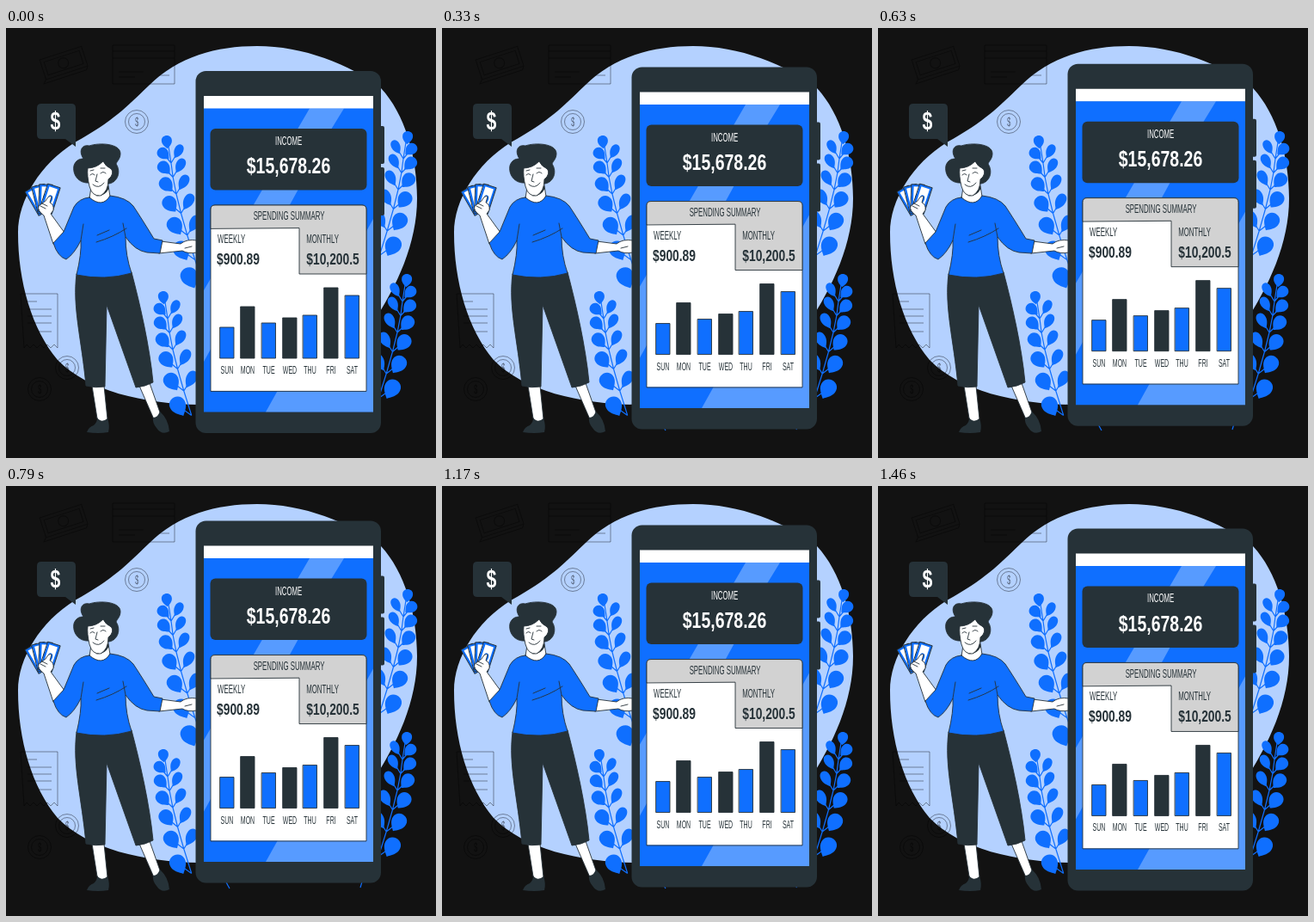
An HTML page that plays this animation: 500 by 500 pixels, repeating every 1.5 s.

```html
<!DOCTYPE html>
<html lang="en">
<head>
<meta charset="utf-8">
<title>Income app</title>
<style>
  html, body { margin: 0; width: 100%; height: 100%; overflow: hidden; background: #121212; }
  svg { display: block; width: 100%; height: 100%; }
  .blue { fill: #0f6fff; }
  .dark { fill: #263238; }
  .white { fill: #fff; }
  .ink { stroke: #263238; stroke-width: .9; stroke-linejoin: round; stroke-linecap: round; }
  .line { fill: none; }
  .faint { fill: none; stroke: #000; stroke-opacity: .4; }
  .stem { fill: none; stroke: #0f6fff; stroke-width: 1.2; }
  text { font-family: "Liberation Sans", Arial, sans-serif; text-anchor: middle;
         transform-box: fill-box; transform-origin: center; }
  .thin { transform: scaleX(.56); }
  .bold { transform: scaleX(.735); font-weight: bold; }
</style>
</head>
<body>
<svg viewBox="0 0 500 500">
  <path fill="#b4d1ff" d="M14 238C14 200 40 158 80 133C125 108 140 92 166 67C200 33 245 21 292 21C345 21 400 42 436 70C464 100 478 150 478 198C478 250 455 300 425 345C380 420 300 438 225 438C160 437 95 422 60 386C30 350 14 295 14 238Z"/>

  <g class="faint">
    <g transform="rotate(-18 66 42)">
      <path d="M42 29H93V53H42Z M46 33H89V49H46Z M42 53L38 57H90L93 53"/>
      <circle cx="67" cy="41" r="6"/>
    </g>
    <path d="M124 20H196V65H124Z M124 27H196 M124 35H196 M131 51H160 M131 57H150 M178 55H190"/>
    <path d="M17 309H60V372l-4-4-4 4-4-4-4 4-4-4-4 4-4-4-4 4-4-4-3 4Z M25 318H36 M25 327H53 M25 335H53 M25 343H53 M38 353H53"/>
    <g id="coins"></g>
  </g>

  <g id="plants"></g>

  <g id="bubble">
    <path class="dark" d="M41 88H76Q81 88 81 93V138L69 129H41Q36 129 36 124V93Q36 88 41 88Z"/>
    <text class="bold white" x="57.500" y="118.500" font-size="29">$</text>
  </g>

  <g id="woman">
    <path class="white ink" d="M100 416L106 454Q110 461 118 455L114 416Z M155 416L172 455Q177 453 179 447L167 413Z"/>
    <path class="dark" d="M106 453Q111 460 118 454Q121 462 119 470Q107 472 94 470Q96 464 102 462Q106 459 106 453Z M171 453Q177 453 179 446Q189 455 190 469Q181 474 175 465Q170 459 171 453Z"/>
    <path class="dark ink" d="M82 286C77 325 88 362 93 416Q104 419 115 417L117 322L151 418Q162 417 171 412C167 370 156 322 146 284Z"/>
    <g id="bills" transform="translate(46 216)"></g>
    <path class="white ink" d="M55 251L44 218Q36 212 38 207L46 201Q50 194 53 196L51 203Q56 205 55 212L52 216L68 238Z"/>
    <path class="line ink" d="M40 207L46 210M42 204L48 207"/>
    <path class="white ink" d="M180 248L203 251Q210 245 222 247V261Q212 263 205 259L178 262Z"/>
    <path class="line ink" d="M208 256L216 254"/>
    <path class="dark ink" d="M90 152C84 143 88 135 97 137C108 133 133 134 133 146C133 152 129 155 128 158C134 167 130 179 120 181L97 180C84 181 77 170 79 160C81 154 85 152 90 152Z"/>
    <path class="white ink" d="M99 185L97 198Q112 211 121 196L118 177Z"/>
    <path class="dark" d="M104 195Q116 193 119 182L119.500 187Q114 197 104 195Z"/>
    <path class="white ink" d="M95 163Q105 163 113 155Q116 161 121 163Q126 166 122 173L119 176Q119 190 110 195Q100 196 97 184Q94 172 95 163Z"/>
    <path class="line ink" d="M98 171q3-3 5 0M110 169q3-3 6 0M106 170l-2 8 3 1M101 182q7 6 13-2M98 166l4-1M110 163l5 0"/>
    <path class="blue ink" d="M97 197Q85 198 79 208L67 237L55 250Q60 266 70 269Q80 262 87 247Q88 262 82 287Q115 294 146 285Q139 265 139 243Q150 259 164 261L179 262L182 247L172 245Q158 222 148 207Q140 197 121 195Q112 210 97 197Z"/>
    <path class="line ink" d="M105 249Q125 243 140 233M106 241L120 235M87 247L90 228M139 243L136 227"/>
  </g>

  <g id="phone">
    <rect class="dark" x="432" y="114" width="8" height="44" rx="2"/>
    <rect class="dark" x="432" y="162" width="8" height="56" rx="2"/>
    <rect class="dark" x="220.500" y="50" width="215.500" height="421" rx="12"/>
    <path class="white" d="M230 79H427V94H230Z"/>
    <path class="blue" d="M230 93.500H427V446.500H230Z"/>
    <path class="white" opacity=".3" d="M353 93.500H393L378 118L230 388V305Z M302 446.500H427V222Z"/>
    <rect class="dark" x="237.500" y="117" width="182" height="71.500" rx="6"/>
    <path class="white ink" d="M238 422V211Q238 206 243 206H414Q419 206 419 211V422Z"/>
    <path class="ink" fill="#d2d2d2" d="M238 233V211Q238 206 243 206H414Q419 206 419 211V286H341V233Z"/>
    <g id="chart"></g>
  </g>
</svg>
<script>
const $ = id => document.getElementById(id);
const add = (id, markup) => $(id).insertAdjacentHTML('beforeend', markup);

const label = (str, x, y, size, style, fill = '#263238') =>
  add('chart', `<text class="${style}" x="${x}" y="${y}" font-size="${size}" fill="${fill}">${str}</text>`);

// Each coin is two rings around a dollar sign.
for (const [x, y] of [[152, 109], [71, 395], [39, 420]])
  add('coins', `<circle cx="${x}" cy="${y}" r="13.500"/><circle cx="${x}" cy="${y}" r="9.500"/>
    <text class="thin" x="${x}" y="${y + 5}" font-size="14" stroke="none" fill="#000" opacity=".5">$</text>`);

for (const angle of [-30, -14, 2, 18])
  add('bills', `<g transform="rotate(${angle})"><rect class="blue ink" x="-8" y="-34" width="15" height="32"/>
    <rect class="white" x="-5.500" y="-31.500" width="10" height="27"/>
    <ellipse class="blue" cx="-.5" cy="-18" rx="3" ry="4.500"/></g>`);

// A teardrop centred on (x, y), its round end pointing along the angle.
const leaf = (x, y, length, angle, slim = 1) =>
  `<path class="blue" transform="translate(${x} ${y}) rotate(${angle}) scale(${length * slim} ${length})"
    d="M0 .55C-.15 .4 -.42 .2 -.4 -.1C-.38 -.6 .38 -.6 .4 -.1C.42 .2 .15 .4 0 .55Z"/>`;

// side is -1 when the large leaves grow to the left, 1 to the right.
function plant(x, y, side, count) {
  let stem = `M${x - side * 4} ${y}`, twigs = '';
  let leaves = leaf(x - side * 4, y + 7, 15, side * 6);
  for (let i = 0; i < count; i++) {
    const cx = x - side * .85 * i * i, cy = y + 21 + 15 * i + 1.5 * i * i;
    const sx = cx - side * (9 + 1.3 * i), sy = cy + 11;
    stem += `L${sx} ${sy}`;
    leaves += leaf(cx, cy, 16 + 1.5 * i, side * -(40 - 50 * 2 + 5 * i) * .8);
    twigs += `M${sx} ${sy}L${cx} ${cy}`;
    if (i < 5) {
      const ix = sx - side * 8.5, iy = cy - 3;
      leaves += leaf(ix, iy, 17 + i, -side * 28, .75);
      twigs += `M${sx} ${sy}L${ix} ${iy}`;
    }
  }
  add('plants', `<path class="stem" d="${stem}${twigs}"/>${leaves}`);
}
plant(183, 125, -1, 7);
plant(179, 306, -1, 6);
plant(471, 120, 1, 6);
plant(470, 286, 1, 6);
add('plants', '<path class="stem" d="M250 445Q255 460 260 468M417 450L412 467"/>');

label('INCOME', 328.5, 136, 14, 'thin', '#fff');
label('$15,678.26', 328.5, 169.5, 26.5, 'bold', '#fff');
label('SPENDING SUMMARY', 329, 223.5, 14, 'thin');
label('WEEKLY', 262, 250, 14, 'thin');
label('MONTHLY', 368, 250, 14, 'thin');
label('$900.89', 270, 275, 18.8, 'bold');
label('$10,200.5', 380, 275, 18.8, 'bold');

const days = [['SUN', 257, 36], ['MON', 281, 60], ['TUE', 305.5, 41], ['WED', 330, 47],
              ['THU', 353.5, 50], ['FRI', 378, 82], ['SAT', 402.5, 73]];
days.forEach(([day, x, height], i) => {
  add('chart', `<rect class="${i % 2 ? 'dark' : 'blue'} ink" x="${x - 8}" y="${384 - height}" width="16" height="${height}"/>`);
  label(day, x, 402, 12.5, 'thin');
});

// The phone floats up 10 units and back at a constant speed, 24 steps a second.
const LOOP = 1500, STEPS = 36, LIFT = 10;
function draw() {
  const step = Math.floor((performance.now() % LOOP + 5) * STEPS / LOOP) % STEPS;
  const lift = LIFT * (1 - Math.abs(1 - 2 * step / STEPS));
  $('phone').setAttribute('transform', `translate(0 ${-lift})`);
  requestAnimationFrame(draw);
}
draw();
</script>
</body>
</html>
```
